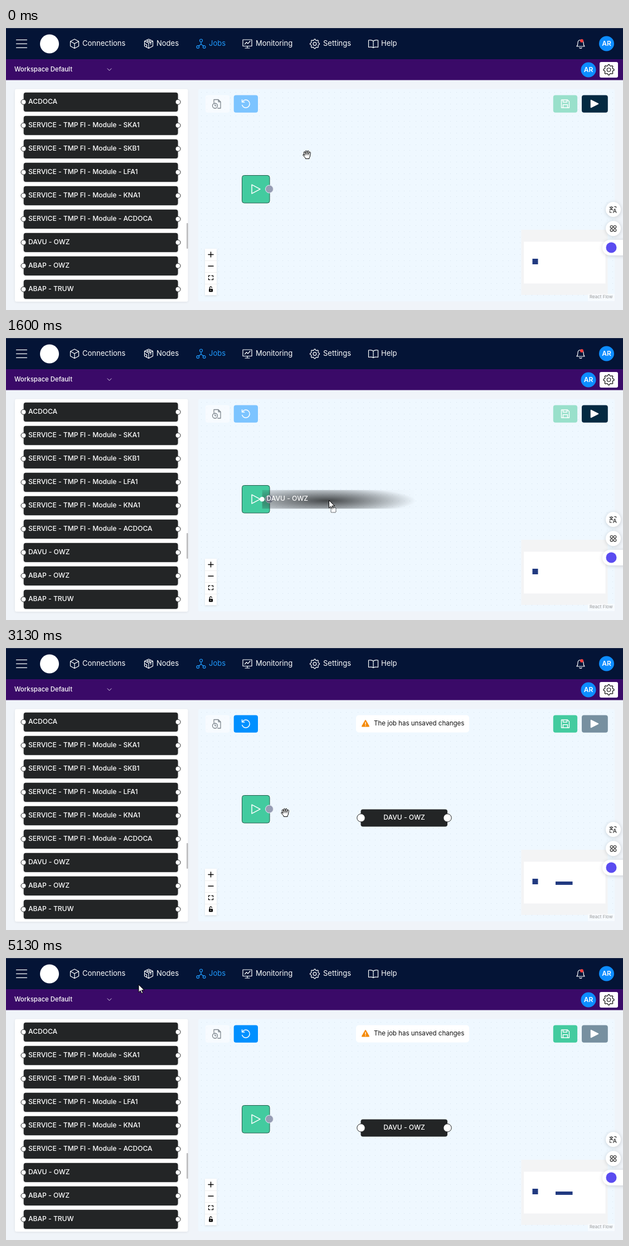
An HTML page with a canvas that plays this animation: 1107 px wide and 506 px high, repeating every 5200 ms.

```html
<!DOCTYPE html>
<html lang="en">
<head>
<meta charset="utf-8">
<title>Job editor</title>
<style>
html, body { margin: 0; width: 100%; height: 100%; overflow: hidden; background: #f0f4f9; }
canvas { display: block; width: 100vw; height: 100vh; }
</style>
</head>
<body>
<canvas id="stage" width="1107" height="506"></canvas>
<script>
const c = document.getElementById('stage').getContext('2d');
const LOOP = 5200, STEP = 200 / 3;
const DARK = '#232526', NAVY = '#041436', BLUE = '#0090ff', GREEN = '#43cb9f';
const DROP = 32;

// Pointer position: step, x, y
const POINTER = [
  [0, 540, 227], [1, 530, 232], [4, 330, 322], [7, 165, 397], [8, 156, 401], [12, 147, 390],
  [14, 147, 390], [15, 225, 372], [17, 400, 325], [19, 540, 297], [22, 562, 292],
  [30, 632, 290], [31, 638, 290], [35, 638, 290], [36, 627, 292], [39, 551, 298],
  [41, 522, 288], [43, 513, 292], [47, 501, 295], [51, 504, 291], [55, 512, 269],
  [60, 512, 269], [61, 420, 330], [63, 120, 454], [65, 120, 454], [66, 92, 476],
  [75, 70, 438], [76, 150, 240], [77, 238, 48]
];
// Offset of the dragged row from its place in the list
const DRAG = [[15, 67, -20], [17, 235, -58], [19, 367, -85], [22, 414, -95], [30, 468, -98], [31, 490, -98]];

const ROWS = ['ACDOCA', ...['SKA1', 'SKB1', 'LFA1', 'KNA1', 'ACDOCA'].map(s => 'SERVICE - TMP FI - Module - ' + s),
  'DAVU - OWZ', 'ABAP - OWZ', 'ABAP - TRUW'];
const ITEM = ROWS[6];

const CURSORS = {
  hand: 'M-1.6 1.2Q0 -.9 1.4 1.2V6Q3 5 4 6.6Q5.6 5.8 6.4 7.4Q8 7 8 9V11.5Q8 13.5 6.6 15V16.5H-1V15Q-3.8 12.5 -5 9.6Q-4.8 7.6 -2.6 9.2L-1.6 10.4Z',
  grab: 'M-4.4 1.6L-5.8 -3.4Q-5.6 -5.6 -3.8 -4.6L-2.4 -1L-2.8 -6Q-1.8 -8 -.4 -6.2L.2 -1.4L1 -6.4Q2.4 -7.6 3.2 -6L2.9 -1L4.4 -4.4Q6.2 -5 6.4 -3.2L5.6 2Q5.4 4.6 4 6V7.6H-2.8V6.2L-7 1.4Q-7.6 -.8 -5.4 0Z',
  arrow: 'M0 0V13.5L3.2 10.6L5.4 15.6L7.6 14.6L5.4 9.8H9.8Z'
};

const NAV = [
  ['Connections', 123, 137, 'M0 -8L7.5 -4V4.5L0 8.5L-7.5 4.5V-4ZM-7.5 -4L0 0L7.5 -4M0 0V8.5'],
  ['Nodes', 256, 270, 'M0 -8L7.5 -4.5V4.5L0 8.5L-7.5 4.5V-4.5ZM-7.5 -4.5L0 -1L7.5 -4.5M0 -1V8.5M-3.8 -6.3L3.8 -2.8V1.5M-7.5 0L-3.5 2V6.5M3.8 -6.3L-3.8 -2.8'],
  ['Jobs', 350, 364, 'M-2.5 -5.5a2.5 2.5 0 1 0 5 0a2.5 2.5 0 1 0 -5 0M-8 6a2.3 2.3 0 1 0 4.6 0a2.3 2.3 0 1 0 -4.6 0M3.4 6a2.3 2.3 0 1 0 4.6 0a2.3 2.3 0 1 0 -4.6 0M0 -3V1L-4.5 4.5M0 1L4.5 4.5'],
  ['Monitoring', 433, 448, 'M-8 -7H8V4.5H-8ZM0 4.5V8M-4 8H4M-4.5 1L-1.5 -2.5L1 0L5 -4.5'],
  ['Settings', 554, 569, null],
  ['Help', 659, 673, 'M0 -4.5Q-3 -7 -8.5 -6V6.5Q-3 5.5 0 7.5Q3 5.5 8.5 6.5V-6Q3 -7 0 -4.5V7.5']
];

function box(x, y, w, h, r, fill, stroke) {
  c.beginPath();
  c.roundRect(x, y, w, h, r);
  paint(fill, stroke);
}

function disc(x, y, r, fill, stroke) {
  c.beginPath();
  c.arc(x, y, r, 0, 7);
  paint(fill, stroke);
}

function paint(fill, stroke) {
  if (fill) { c.fillStyle = fill; c.fill(); }
  if (stroke) { c.strokeStyle = stroke; c.lineWidth = 1; c.stroke(); }
}

function text(s, x, y, size, color, weight = 400, align = 'left') {
  c.font = `${weight} ${size}px Inter, sans-serif`;
  c.textAlign = align;
  c.textBaseline = 'middle';
  c.fillStyle = color;
  c.fillText(s, x, y);
}

function icon(d, x, y, stroke, width = 1.2, fill) {
  const p = new Path2D(d);
  c.save();
  c.translate(x, y);
  c.lineJoin = c.lineCap = 'round';
  if (fill) { c.fillStyle = fill; c.fill(p); }
  if (stroke) { c.strokeStyle = stroke; c.lineWidth = width; c.stroke(p); }
  c.restore();
}

function gear(x, y, r, color) {
  c.beginPath();
  for (let i = 0; i < 32; i++) {
    const a = (i - 0.5) * Math.PI / 16, d = i % 4 < 2 ? r : r * 0.78;
    c.lineTo(x + d * Math.cos(a), y + d * Math.sin(a));
  }
  c.closePath();
  c.lineJoin = 'round';
  c.strokeStyle = color;
  c.lineWidth = 1.2;
  c.stroke();
  c.beginPath();
  c.arc(x, y, r * 0.34, 0, 7);
  c.stroke();
}

function shadowed(blur, alpha, draw) {
  c.save();
  c.shadowColor = `rgba(0,0,0,${alpha})`;
  c.shadowBlur = blur;
  c.shadowOffsetY = 1;
  draw();
  c.restore();
}

function avatar(x, y) {
  disc(x, y, 13.5, '#0d8dff');
  text('AR', x, y, 12, '#fff', 600, 'center');
}

function header() {
  c.fillStyle = NAVY;
  c.fillRect(0, 0, 1107, 56);
  c.fillStyle = '#303a55';
  c.fillRect(0, 0, 1107, 1);
  c.fillStyle = '#3a0a68';
  c.fillRect(0, 56, 1107, 37.5);
  icon('M0 0H19M0 7H19M0 14H19', 18.5, 21.3, '#fff', 1.3);
  disc(78, 28.5, 17, '#fff');
  for (const [label, ix, tx, d] of NAV) {
    const color = label === 'Jobs' ? '#1f9bff' : '#fff';
    if (d) icon(d, ix, 28, color);
    else gear(ix, 28.5, 8.5, color);
    text(label, tx, 28, 13, color);
  }
  icon('M-7 5Q-5 3 -5 -1.5Q-5 -6.5 0 -6.5Q5 -6.5 5 -1.5Q5 3 7 5ZM-2 7.5Q0 9.5 2 7.5', 1031, 28, '#fff');
  disc(1033, 23, 3, '#ff4040');
  avatar(1077.5, 28);
  text('Workspace Default', 15, 74.5, 11.4, '#fff', 500);
  icon('M-3.5 -1.7L0 1.8L3.5 -1.7', 185.5, 74.5, '#d8cce6', 1);
  avatar(1045, 75);
  box(1065, 61, 33, 28, 3, '#fff');
  gear(1081.5, 75, 9.5, '#111');
}

function sidebar() {
  shadowed(4, 0.08, () => box(16, 109.5, 310.5, 381.5, 3, '#fff'));
  ROWS.forEach((s, i) => {
    const y = 115.8 + 42 * i;
    shadowed(2, 0.2, () => box(31.7, y, 276.8, 34.3, 4, DARK));
    disc(31.5, y + 17, 4.5, '#fff', DARK);
    disc(308.5, y + 17, 4.5, '#fff', DARK);
    text(s, 40, y + 16.7, 12.1, '#fff', 500);
  });
  box(324, 350, 2.5, 46, 1, '#b9b9bb');
}

function toolbar(saved) {
  box(358, 120.5, 43, 31.3, 4, 'rgba(255,255,255,.55)');
  icon('M-5 -2V-7.5H3L7 -3.5V8H2M3 -7.5V-3.5H7M-7.5 3.5a4.5 4.5 0 1 0 9 0a4.5 4.5 0 1 0 -9 0M-3 1V3.7H-1', 378, 136, '#7d858c', 1.3);
  box(408.7, 120.5, 43.3, 31.3, 4, saved ? '#7cc4ff' : BLUE);
  icon('M-6.3 -3.5A7 7 0 1 1 -6.8 2.5M-7 -7.3V-3H-2.7', 430.5, 136, '#fff', 1.5);
  box(981.8, 120.5, 43.3, 31.3, 4, saved ? '#99e0cb' : GREEN);
  icon('M-7 -7H4L7 -4V7H-7ZM-4 -7V-3H3V-7M-4 7V1.5H4V7', 1003.5, 136, '#fff', 1.4);
  box(1033, 120.5, 46.8, 31.3, 4, saved ? '#042a42' : '#7790a0');
  icon('M-6 -6.5L7 0L-6 6.5Z', 1055.5, 136, '#fff', 1.5, '#fff');
  if (saved) return;
  box(628, 120.5, 203, 31, 5, '#fff');
  icon('M0 -5.5L6 5H-6Z', 645, 135.5, '#f58a07', 2, '#f58a07');
  icon('M0 -2V1.5M0 3.8V4', 645, 135.5, '#fff', 1.4);
  text('The job has unsaved changes', 660, 135.5, 11.5, '#111');
}

function flow(saved) {
  box(345, 109.5, 747, 381, 3, '#eff8ff');
  c.fillStyle = 'rgba(150,172,196,.3)';
  for (let y = 115; y < 489; y += 10.4)
    for (let x = 350; x < 1091; x += 10.4) c.fillRect(Math.round(x), Math.round(y), 1, 1);

  box(423.5, 264.5, 49.5, 49.5, 4, GREEN, '#24604d');
  icon('M-7 -8L8 0L-7 8Z', 448, 289.2, '#fff', 1.5);
  disc(472.5, 289, 7, '#969db4', '#e6eaf2');

  if (!saved) {
    box(636.5, 289.5, 155.5, 31, 4, DARK);
    disc(637, 304.8, 7.2, '#fff', DARK);
    disc(792, 304.8, 7.2, '#fff', DARK);
    text(ITEM, 714.5, 304, 12.1, '#fff', 500, 'center');
  }
  toolbar(saved);

  shadowed(3, 0.12, () => box(357, 396, 21, 83.5, 0, '#fff'));
  c.fillStyle = '#eee';
  for (let i = 1; i < 4; i++) c.fillRect(357, 396 + 21 * i, 21, 1);
  icon('M-4.5 0H4.5M0 -4.5V4.5', 367.5, 406.5, '#000', 1.4);
  icon('M-4.5 0H4.5', 367.5, 427.3, '#000', 1.4);
  icon('M-4 -1.5V-3.7H-1.5M1.5 -3.7H4V-1.5M4 1.5V3.7H1.5M-1.5 3.7H-4V1.5', 367.5, 448, '#000', 1.3);
  icon('M-2 0V-2.3A1.9 1.9 0 0 1 1.8 -2.6', 367.5, 468.5, '#000', 1.2);
  box(364, 468, 7, 5.5, 1, '#000');
  disc(367.5, 470.5, 0.9, '#fff');

  c.fillStyle = '#f3f4f5';
  c.fillRect(924.5, 362, 155, 117);
  c.fillStyle = '#fff';
  c.fillRect(929, 383.5, 146.5, 75);
  c.fillStyle = '#213a80';
  c.fillRect(944.5, 414, 10, 10);
  if (!saved) c.fillRect(986, 419, 30.5, 6);
  c.fillStyle = 'rgba(255,255,255,.5)';
  c.fillRect(1044, 477, 48, 13);
  text('React Flow', 1047, 483, 8, '#999');
}

function sideButtons() {
  shadowed(7, 0.16, () => {
    disc(1089.5, 325.5, 13.5, '#fff');
    disc(1089.5, 359.8, 13.5, '#fff');
    box(1070, 380, 60, 28, 14, '#fff');
  });
  icon('M-6 -4H0M-3 -5.5V-4M-5 -4Q-4 0 0 1M-1 -4Q-2 0 -6 1M.5 6L3.3 -1L6 6M1.4 4H5.2M2.5 -5H5.5V-3M-5.5 3V5.5H-2.5', 1089, 325.5, '#333', 1.1);
  for (const dx of [-3, 3])
    for (const dy of [-3, 3]) {
      c.beginPath();
      c.arc(1089.5 + dx, 359.8 + dy, 2.3, 0, 7);
      c.strokeStyle = '#333';
      c.lineWidth = 1.2;
      c.stroke();
    }
  disc(1086, 394, 9.5, '#5a4cf0');
}

function ghost(dx, dy) {
  c.save();
  c.translate(dx, dy);
  c.beginPath();
  c.rect(32, 368.5, 277, 33.5);
  c.clip();
  const base = c.createLinearGradient(32, 0, 309, 0);
  base.addColorStop(0, 'rgba(35,37,38,.16)');
  base.addColorStop(1, 'rgba(35,37,38,0)');
  c.fillStyle = base;
  c.fillRect(32, 368, 277, 35);
  // Squashed glow around the grip point
  c.translate(148, 387.5);
  c.scale(1, 0.15);
  const core = c.createRadialGradient(0, 0, 0, 0, 0, 160);
  core.addColorStop(0, 'rgba(35,37,38,.82)');
  core.addColorStop(1, 'rgba(35,37,38,0)');
  c.fillStyle = core;
  c.fillRect(-161, -161, 322, 322);
  c.restore();
  disc(32 + dx, 385 + dy, 4.3, '#fff');
  text(ITEM, 40 + dx, 384.3 + dy, 12.1, '#fff', 500);
}

function at(keys, k) {
  const i = Math.max(1, keys.findIndex(p => p[0] >= k));
  const [k0, x0, y0] = keys[i - 1], [k1, x1, y1] = keys[i];
  const u = (k - k0) / (k1 - k0);
  return [x0 + (x1 - x0) * u, y0 + (y1 - y0) * u];
}

function pointer(k) {
  if (k > 66 && k < 75) return;
  const [x, y] = at(POINTER, k);
  const dragging = k >= 15 && k <= 30;
  let kind = 'arrow';
  if (!dragging && y > 109) {
    if (x < 320 || x >= 630) kind = 'hand';
    else if (x > 345) kind = 'grab';
  }
  icon(CURSORS[kind], x, y, '#000', 1, '#fff');
  if (kind === 'grab') icon('M-2.4 -1V1M.2 -1.4V1M2.9 -1V1', x, y, '#000', 0.8);
  if (kind === 'hand') icon('M1.4 6V8.5M4 6.6V8.5M6.4 7.4V9', x, y, '#000', 0.6);
  if (dragging) {
    c.save();
    c.setLineDash([1.5, 1.2]);
    box(x + 3.5, y + 13, 9, 8.5, 1, 'rgba(255,255,255,.6)', '#000');
    c.restore();
  }
}

function render(k) {
  const saved = k < DROP;
  c.fillStyle = '#f0f4f9';
  c.fillRect(0, 0, 1107, 506);
  header();
  sidebar();
  flow(saved);
  sideButtons();
  if (k >= 15 && saved) ghost(...at(DRAG, k));
  pointer(k);
}

let last = -1;
function tick() {
  const k = Math.floor((performance.now() % LOOP + 4) / STEP) % 78;
  if (k !== last) render(last = k);
  requestAnimationFrame(tick);
}
tick();
</script>
</body>
</html>
```
